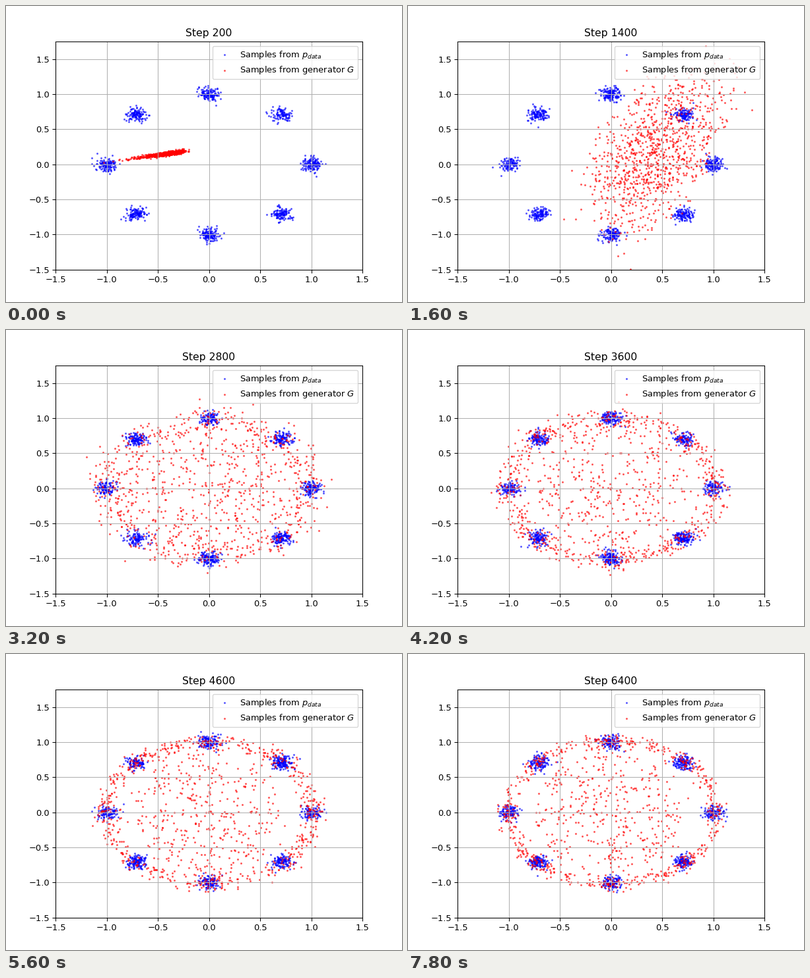
Animation, 600 px wide and 450 px high, one loop 8 s. Source, as a matplotlib script:

```python
import numpy as np
import matplotlib.pyplot as plt
from matplotlib.animation import FuncAnimation

FRAMES, INTERVAL = 40, 200
COUNT = 1000


def step_at(frame):
    """Training step on show; every fifth frame holds the previous step."""
    return 200 * (frame + 1 - (frame + 3) // 5)


def ramp(value, start, end):
    return float(np.clip((value - start) / (end - start), 0, 1))


def mix(a, b, t):
    return a + (b - a) * t


def data_samples(rng):
    angle = rng.integers(0, 8, COUNT) * np.pi / 4
    centers = np.column_stack([np.cos(angle), np.sin(angle)])
    return centers + rng.normal(0, 0.05, (COUNT, 2))


def streak(z):
    """Thin, nearly flat streak with a tail to the left."""
    x = np.minimum(-0.13 - 0.27 * np.exp(-0.38 * z[:, 1]), -0.15)
    y = 0.205 + 0.2 * (x + 0.15) + 0.013 * z[:, 0]
    return np.column_stack([x, y])


def banana(z):
    """Broad bent band rising to the upper right."""
    y = 0.25 + 0.56 * z[:, 1]
    width = 0.12 + 0.025 * np.clip(y, -1, 1)
    x = 0.5 + 0.47 * y + 0.09 * y ** 2 + width * z[:, 0]
    return np.column_stack([x, y])


def disk(z, noise, ring, spread, pull):
    """Filled disk whose outer part gathers into a ring as `ring` grows."""
    u = 1 - np.exp(-(z ** 2).sum(axis=1) / 2)
    core = 0.38
    inner = u < core
    filled = 1.1 * np.sqrt(u)
    edged = np.where(inner, 0.93 * np.sqrt(u / core), 1.02)
    radius = mix(filled, edged, ring) + spread * noise
    angle = np.arctan2(z[:, 1], z[:, 0])
    angle = angle - pull * np.sin(8 * angle) / 8
    squeeze = np.where(inner, 1 - 0.2 * ring, 1)
    return np.column_stack([radius * np.cos(angle) * squeeze,
                            radius * np.sin(angle)])


def generator_samples(step, rng):
    z = rng.normal(size=(COUNT, 2))
    noise = rng.normal(size=COUNT)
    if step <= 1000:
        t = 1 - (1 - ramp(step, 200, 1000)) ** 4
        return mix(streak(z), banana(z), t)
    ring = ramp(step, 1800, 3800) ** 0.8
    spread = 0.045 + 0.1 * np.exp(-max(step - 2000, 0) / 1200)
    pull = 0.5 * ramp(step, 2000, 6400)
    t = ramp(step, 1000, 2000)
    t = t * t * (3 - 2 * t)
    return mix(banana(z), disk(z, noise, ring, spread, pull), t)


fig, ax = plt.subplots(figsize=(6.4, 4.8), dpi=93.75)
style = dict(s=2, alpha=0.5)
real = ax.scatter([], [], c="blue", label="Samples from $p_{data}$", **style)
fake = ax.scatter([], [], c="red", label="Samples from generator $G$", **style)
ax.set_xlim(-1.5, 1.5)
ax.set_ylim(-1.5, 1.75)
ax.grid(True)
ax.legend(loc="upper right")
title = ax.set_title("Step 200")


def draw(frame):
    step = step_at(frame)
    rng = np.random.default_rng(step)
    real.set_offsets(data_samples(rng))
    fake.set_offsets(generator_samples(step, rng))
    title.set_text(f"Step {step}")
    return real, fake, title


anim = FuncAnimation(fig, draw, frames=FRAMES, interval=INTERVAL,
                     init_func=lambda: draw(0), repeat=True, repeat_delay=0)
plt.show()
```
